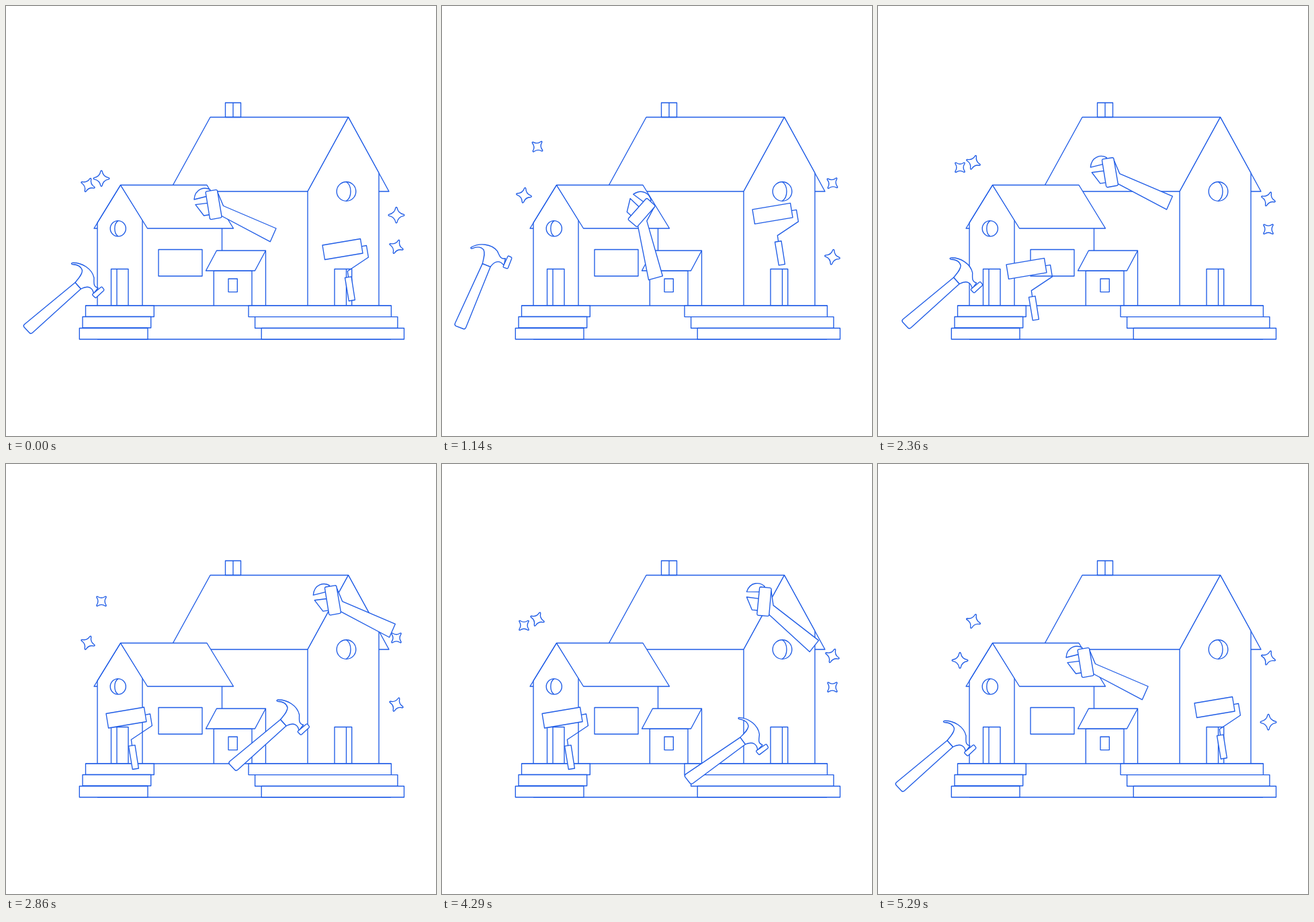
An HTML page with a canvas for the animation above (5.37 s loop, 640 by 640 pixels).

```html
<!DOCTYPE html>
<html lang="en">
<head>
<meta charset="utf-8">
<title>House repair</title>
<style>
  html, body { margin: 0; width: 100%; height: 100%; overflow: hidden; background: #fff; }
  canvas { display: block; width: 640px; height: 640px; }
</style>
</head>
<body>
<canvas id="stage"></canvas>
<script>
const LOOP = 5370, STEP = LOOP / 75;
const canvas = document.getElementById('stage');
const dpr = window.devicePixelRatio || 1;
canvas.width = canvas.height = 640 * dpr;
const ctx = canvas.getContext('2d');

// ---------- helpers ----------
const clamp = u => Math.max(0, Math.min(1, u));
const smooth = u => u * u * (3 - 2 * u);

function ease(t, from, to, power) {
  const u = clamp((t - from) / (to - from));
  return u < 0.5 ? Math.pow(2 * u, power) / 2 : 1 - Math.pow(2 - 2 * u, power) / 2;
}

// keys: [time, value] pairs with smooth easing between them
function track(t, keys) {
  let [t0, v0] = keys[0];
  for (const [t1, v1] of keys) {
    if (t < t1) return v0 + (v1 - v0) * smooth(clamp((t - t0) / (t1 - t0)));
    t0 = t1;
    v0 = v1;
  }
  return v0;
}

function bezier(u, a, b, c, d) {
  const v = 1 - u;
  return v * v * v * a + 3 * v * v * u * b + 3 * v * u * u * c + u * u * u * d;
}

function paint(path, fill = true) {
  if (fill) ctx.fill(path);
  ctx.stroke(path);
}
const shape = d => new Path2D(d);
const draw = (d, fill) => paint(shape(d), fill);
function box(x1, y1, x2, y2) {
  const p = new Path2D();
  p.rect(x1, y1, x2 - x1, y2 - y1);
  paint(p);
}

function placed(dx, dy, degrees, px, py, part) {
  ctx.save();
  ctx.translate(px + dx, py + dy);
  ctx.rotate(degrees * Math.PI / 180);
  ctx.translate(-px, -py);
  part();
  ctx.restore();
}

// ---------- house ----------
function roundWindow(x, y, r, bulge) {
  const p = new Path2D();
  p.arc(x, y, r, 0, Math.PI * 2);
  paint(p);
  const c = x + bulge * 1.33;
  draw(`M${x} ${y - r}C${c} ${y - r * 0.6} ${c} ${y + r * 0.6} ${x} ${y + r}`, false);
}

function house() {
  // large building
  box(326.5, 144, 349.5, 165.5);
  draw('M338 144V165.5', false);
  draw('M248.5 266.5L304 165.5H509.5L449 276H304', false);
  draw('M509.5 165.5L570 276H555', false);
  draw('M449 446V276L509.5 165.5L555 248.5V446');
  roundWindow(506.5, 276, 14.3, 6.5);
  box(489, 391.5, 514.7, 446);
  draw('M506.5 391.5V446', false);

  // small building
  draw('M321.5 331V364', false);
  draw('M136 331H131L170.5 266.5', false);
  draw('M136 446V322.5L170.5 266.5L203 318.5V446', false);
  draw('M170.5 266.5H299L338.5 331H210.5Z');
  roundWindow(166.8, 331.2, 11.6, -5);
  box(156.5, 391.5, 182, 446);
  draw('M165 391.5V446', false);
  box(227, 362.5, 292, 402);

  // porch
  draw('M386.5 446V364', false);
  draw('M309.3 446V394H366V446', false);
  draw('M313.5 364H386.5L370.5 394H297.5Z');
  box(331, 406, 344.3, 425.6);

  // ground and steps
  draw('M118.5 446H573.5M136 496H573', false);
  box(118.5, 446, 220.3, 462.5);
  box(114, 462.5, 215.7, 479);
  box(109.3, 479.5, 211, 496);
  box(361, 446, 573.4, 462.6);
  box(370.6, 462.6, 582.9, 479.5);
  box(380.2, 479.5, 592.5, 496);
}

// ---------- tools ----------
function hammerParts() {
  draw('M103 411.5L111.5 421L39.5 486.3Q37 488.6 35 486.5L27 478Q25.2 475.8 27.5 473.8Z');
  draw('M103 411.5C109 404 113 400 113.5 394C112 387 105 384.8 98.5 384.5' +
       'Q96.3 383 98.5 382.3C113 381.5 128 391 131 404.5C131 412 129.5 417.5 137 419.5' +
       'L130.5 428C129 419.5 123 415 111.5 421Z');
  draw('M141.3 418.5Q142.5 417.5 143.5 418.8L145.6 421.6Q146.3 422.8 145.3 423.8' +
       'L134.5 433.8Q133.3 434.8 132.3 433.8L129 430.5Q128.2 429.5 129.2 428.5Z');
}

function hammer(t) {
  const angle = track(t, [
    [740, 41], [1430, 82], [1740, 32], [2100, 41],
    [3170, 41], [3870, 82], [4070, 28], [4480, 41]
  ]);
  const s = ease(t, 2180, 3125, 3) - ease(t, 4640, 5290, 2);
  const lift = (t < 3800 ? 63 : 14) * 4 * s * (1 - s);
  placed(333.7 * s, -12.9 * s - lift, 41 - angle, 20.3, 490.6, hammerParts);
}

function wrenchParts() {
  draw('M304 273.5C296 269 281.5 271 280 288L300 283Z');
  draw('M300 293.3L282 295.6L294.5 312L304 310.5Z');
  draw('M314 275L323.5 297.5L402 331L393.3 350.8L319 311.5Z');
  draw('M298.5 275.8L312.3 273.6Q314.2 273.4 314.6 275.2L321 312.8' +
       'Q321.2 314.7 319.4 315.1L305.6 317.6Q303.7 317.8 303.3 316L297.2 278Q297 276.2 298.5 275.8Z');
}

function wrench(t) {
  const turn = track(t, [[0, 0], [1180, 51], [2310, 0], [2900, 0], [3860, 28], [4760, 0]]);
  const u = track(t, [[2100, 0], [2950, 1], [4180, 1], [4980, 0]]);
  placed(bezier(u, 0, 45, 131.7, 181.7), bezier(u, 0, -78, -125, -90), turn, 290.6, 289.1, wrenchParts);
}

function rollerParts() {
  draw('M529 357.8L536.5 356.5L539.4 374L508.3 394.7L509.7 404', false);
  draw('M471 356L527.5 346.5L531 368L474.5 377.5Z');
  draw('M504.5 404.4L514 402.9L519.4 437.5L510.3 439Z');
}

function roller(t) {
  const stroke = track(t, [[0, 0], [1180, 54], [2260, 0]]);
  const s = track(t, [[1620, 0], [2580, 1], [4290, 1], [5000, 0]]);
  const dip = 34 * 4 * s * (1 - s);
  placed(-322 * s - stroke * 0.167, 15.5 * s + dip - stroke * 0.986, 0, 0, 0, rollerParts);
}

// ---------- stars ----------
const star = new Path2D();
for (let i = 0; i < 4; i++) {
  const c = Math.cos(i * Math.PI / 2), s = Math.sin(i * Math.PI / 2);
  const at = (x, y) => [x * c - y * s, x * s + y * c];
  if (!i) star.moveTo(...at(1.1, -10.8));
  star.quadraticCurveTo(...at(2.6, -2.6), ...at(10.8, -1.1));
  star.quadraticCurveTo(...at(12.9, 0), ...at(10.8, 1.1));
}
star.closePath();

function twinkle(x, y, phase) {
  const wave = Math.sin(phase);
  ctx.save();
  ctx.translate(x, y + 26.2 * wave);
  ctx.rotate(22.5 * (1 - wave) * Math.PI / 180);
  const k = (11 + wave) / 12;
  ctx.scale(k, k);
  ctx.lineWidth = 1.35 / k;
  paint(star);
  ctx.restore();
}

function stars(t) {
  const a = Math.PI / 2 + t * 0.003287, b = a + Math.PI / 2;
  twinkle(142, 230.5, a);
  twinkle(122, 266.4, b);
  twinkle(581, 285, a);
  twinkle(581, 358.3, b);
}

// ---------- loop ----------
function render(t) {
  ctx.setTransform(dpr, 0, 0, dpr, 0, 0);
  ctx.fillStyle = '#fff';
  ctx.fillRect(0, 0, 640, 640);
  ctx.strokeStyle = '#1f5ce6';
  ctx.lineWidth = 1.35;
  ctx.lineJoin = 'round';
  house();
  stars(t);
  roller(t);
  wrench(t);
  hammer(t);
}

const start = performance.now();
function tick() {
  const t = (performance.now() - start) % LOOP;
  render(Math.min(74, Math.floor(t / STEP + 0.15)) * STEP);
  requestAnimationFrame(tick);
}
tick();
</script>
</body>
</html>
```
